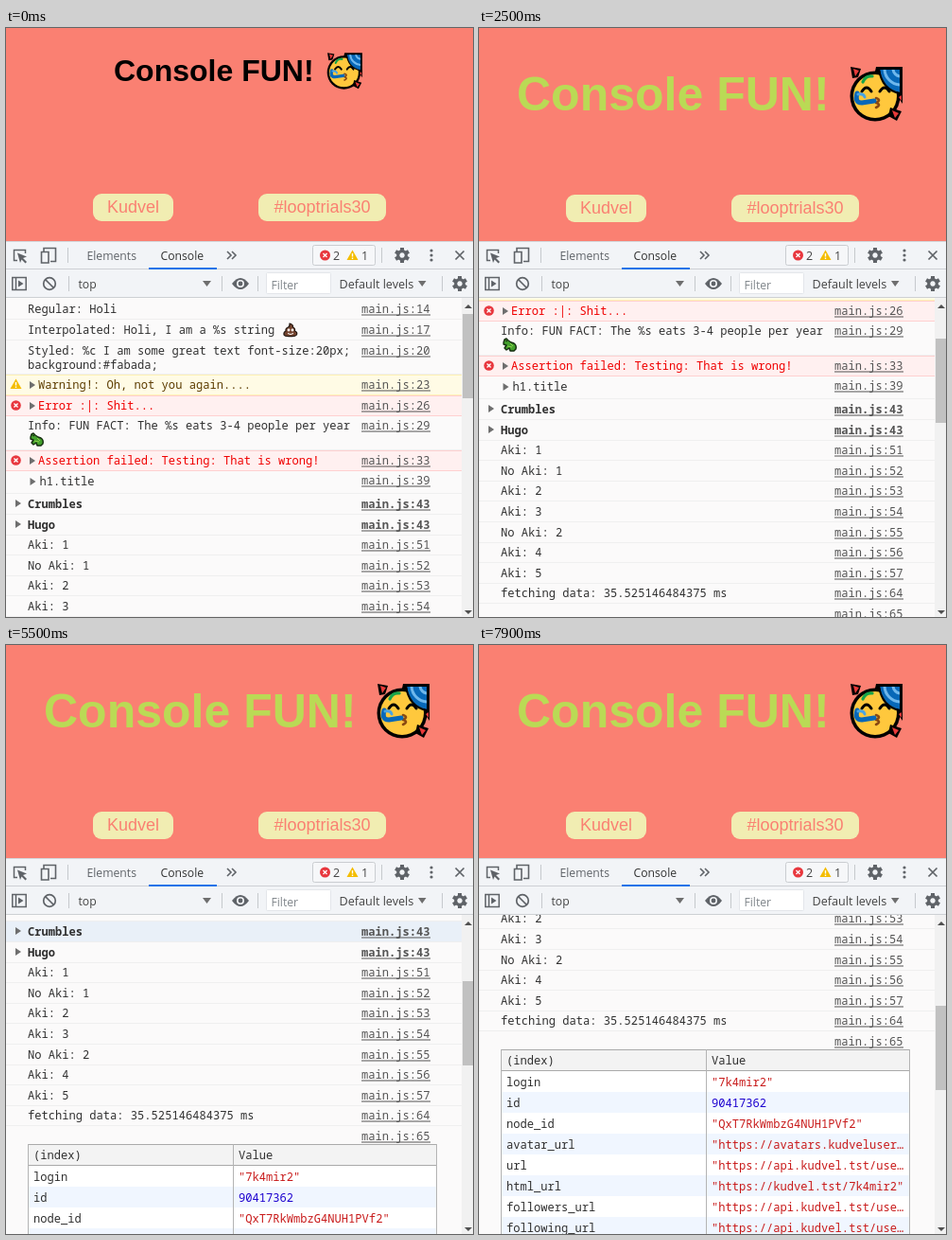
Write an HTML page with a canvas that moves like this. It is 494 px wide and 622 px high and loops after 8000 ms.

```html
<!DOCTYPE html>
<html lang="en">
<head>
<meta charset="utf-8">
<title>Console FUN!</title>
<style>
  html, body { margin: 0; width: 100%; height: 100%; overflow: hidden; background: #fa8072; }
  canvas { display: block; width: 494px; height: 622px; }
</style>
</head>
<body>
<canvas id="stage"></canvas>
<script>
const W = 494, H = 622, LOOP = 8000, TOP = 285, ROW = 21.6;
const MONO = '"Noto Sans Mono", "DejaVu Sans Mono", monospace';
const UI = '"Open Sans", "Noto Sans", sans-serif';
const ARIAL = '"Liberation Sans", Arial, sans-serif';
const GREY = '#5f6368', RED = '#e8373e', AMBER = '#f4bd00';

const canvas = document.getElementById('stage');
const c = canvas.getContext('2d');
const dpr = window.devicePixelRatio || 1;
canvas.width = W * dpr;
canvas.height = H * dpr;

// Scroll position at each step
const SCROLL = [
  [0, 0], [2300, 1], [2400, 70], [2500, 100],
  [2900, 101], [3000, 170], [3100, 200],
  [7700, 201], [7800, 270], [7900, 300]
];

const LOG = [
  { line: 14, text: 'Regular: Holi', h: 22 },
  { line: 17, text: 'Interpolated: Holi, I am a %s string', h: 22, emoji: [poop, 293, -8] },
  { line: 20, text: 'Styled: %c I am some great text font-size:20px;', more: 'background:#fabada;', h: 36 },
  { line: 23, text: 'Warning!: Oh, not you again....', kind: 'warn' },
  { line: 26, text: 'Error :|: Shit...', kind: 'error' },
  { line: 29, text: 'Info: FUN FACT: The %s eats 3-4 people per year', h: 36.6, emoji: [croc, 25, 7] },
  { line: 33, text: 'Assertion failed: Testing: That is wrong!', kind: 'error' },
  { line: 39, text: 'h1.title', kind: 'node', h: 24.6 },
  { line: 43, text: 'Crumbles', kind: 'group', age: 2 },
  { line: 43, text: 'Hugo', kind: 'group', age: 8 },
  ...['Aki: 1', 'No Aki: 1', 'Aki: 2', 'Aki: 3', 'No Aki: 2', 'Aki: 4', 'Aki: 5']
    .map((text, i) => ({ line: 51 + i, text })),
  { line: 64, text: 'fetching data: 35.525146484375 ms' },
  { line: 65, text: '', kind: 'table' }
];

const api = '"https://api.kudvel.tst/use…';
const TABLE = [
  ['login', '"7k4mir2"'], ['id', '90417362'], ['node_id', '"QxT7RkWmbzG4NUH1PVf2"'],
  ['avatar_url', '"https://avatars.kudveluser…'], ['url', api],
  ['html_url', '"https://kudvel.tst/7k4mir2"'], ['followers_url', api],
  ['following_url', api], ['gists_url', api], ['starred_url', api]
];

const STYLE = {
  warn: { bg: '#fffbe5', edge: '#fff0b5', ink: '#5c3c00' },
  error: { bg: '#fff0f0', edge: '#ffd0d0', ink: '#f00000' }
};

function rect(x, y, w, h, fill) {
  c.fillStyle = fill;
  c.fillRect(x, y, w, h);
}

function text(s, x, y, font, fill, align = 'left') {
  c.font = font;
  c.fillStyle = fill;
  c.textAlign = align;
  c.fillText(s, x, y);
}

const mono = (s, x, y, fill = '#303030', bold) =>
  text(s, x, y, (bold ? 'bold ' : '') + '12.1px ' + MONO, fill);

function box(x, y, w, h, r, fill, edge) {
  c.beginPath();
  c.roundRect(x, y, w, h, r);
  if (fill) { c.fillStyle = fill; c.fill(); }
  if (edge) { c.strokeStyle = edge; c.lineWidth = 1; c.stroke(); }
}

function disc(x, y, r, fill) {
  c.beginPath();
  c.arc(x, y, r, 0, 7);
  c.fillStyle = fill;
  c.fill();
}

function stroke(d, color, width) {
  c.strokeStyle = color;
  c.lineWidth = width;
  c.stroke(new Path2D(d));
}

function fill(d, color) {
  c.fillStyle = color;
  c.fill(new Path2D(d));
}

function at(x, y, scale, draw) {
  c.save();
  c.translate(x, y);
  c.scale(scale, scale);
  draw();
  c.restore();
}

function errorIcon(x, y, r) {
  disc(x, y, r, RED);
  at(x, y, 1, () => stroke('M-2 -2L2 2M2 -2L-2 2', '#fff', 1.4));
}

function warnIcon(x, y) {
  at(x, y, 1, () => {
    c.lineJoin = 'round';
    fill('M0 -5.5L6 5H-6Z', AMBER);
    stroke('M0 -2V1.6M0 2.6V4', '#fff', 1.4);
  });
}

function arrow(x, y, open) {
  at(x, y, 1, () => fill(open ? 'M-4 -3H5L.5 3Z' : 'M-2.5 -4L3.5 0L-2.5 4Z', '#6e6e6e'));
}

function gear(x, y) {
  at(x, y, 1, () => {
    for (let i = 0; i < 6; i++) {
      c.rotate(Math.PI / 3);
      rect(-2, -8, 4, 5, GREY);
    }
    c.beginPath();
    c.arc(0, 0, 4.3, 0, 7);
    c.strokeStyle = GREY;
    c.lineWidth = 3.2;
    c.stroke();
  });
}

function poop(x, y) {
  at(x, y, 1, () => {
    c.lineJoin = 'round';
    const d = 'M7 1Q11 2 10.5 5Q13 6 12.5 9Q15.5 10 14.5 13Q13 15 8 14.6Q2 15 1 13Q.5 10 3 9Q2.5 6 5.5 5Q7.5 4 7 1Z';
    fill(d, '#74442f');
    stroke(d, '#241812', 1.2);
    disc(6, 8, 1.4, '#fff');
    disc(10, 8, 1.4, '#fff');
    stroke('M5 11.5Q8 13.5 11 11.5', '#fff', 1);
  });
}

function croc(x, y) {
  at(x, y, 1, () => {
    c.lineJoin = 'round';
    const d = 'M1 5L2 2L4 1L6 3L9 5L12 6Q15 8 14 12L12 14H8L7 11L4 13L2 11L4 8L1 7Z';
    fill(d, '#43a02c');
    stroke(d, '#152c10', 1.4);
    stroke('M5 9L10 10M8 6L11 9', '#8fd04c', 1);
    disc(4, 3.5, .8, '#111');
  });
}

function partyFace(x, y, scale) {
  at(x, y, scale, () => {
    c.lineJoin = c.lineCap = 'round';
    disc(29, 32, 26.5, '#000');
    fill('M30 1H58V34L47 44L27 15Z', '#000');
    disc(29, 32, 23, '#ffc83d');
    c.save();
    const hat = new Path2D('M34 4H55V28Q37 25 34 4Z');
    c.fillStyle = '#0868b8';
    c.fill(hat);
    c.clip(hat);
    for (const r of [8, 17]) {
      c.beginPath();
      c.arc(56, 3, r, 0, 7);
      c.strokeStyle = '#6fb7ec';
      c.lineWidth = 3;
      c.stroke();
    }
    c.restore();
    stroke('M33 3Q36 25 55 29', '#000', 2);
    fill('M3 1L14 3L11 12L5 13Z', '#000');
    fill('M6 3L12 5L8 11Z', '#e83a3a');
    stroke('M16 17Q19 10 26 11', '#16a34a', 3.2);
    stroke('M15 27Q20 19 25 27M34 27Q39 19 44 27', '#000', 3);
    stroke('M30 34Q36 36 30 39Q36 41 30 44', '#8a4a12', 2.6);
    stroke('M10 29Q7 39 15 39L28 37', '#0868b8', 5);
    stroke('M11 30Q17 29 18 33', '#48a4e4', 3);
    fill('M45 44L57 48L52 58L43 53Z', '#000');
    fill('M47 47L54 50L50 55Z', '#e83a3a');
    fill('M52 31L58 28V40Z', '#000');
    fill('M54 33L57 31V37Z', '#e83a3a');
  });
}

function page(big) {
  rect(0, 0, W, 226, '#fa8072');
  if (big) {
    text('Console FUN!', 40, 87, 'bold 50px ' + ARIAL, '#bada55');
    partyFace(390, 40, 1);
  } else {
    text('Console FUN!', 114, 56, 'bold 32px ' + ARIAL, '#000');
    partyFace(338, 25.5, .67);
  }
  const y = big ? 176 : 175;
  const button = (s, x, w) => {
    box(x, y, w, 29, 9, '#f1edb2');
    text(s, x + w / 2, y + 20, '18px ' + ARIAL, '#fa8072', 'center');
  };
  button('Kudvel', 92, 85);
  button('#looptrials30', 267, 135);
}

function toolbars() {
  rect(0, 225, W, 60, '#f2f4f7');
  rect(0, 225, W, 1, '#d3d6da');
  rect(0, 254, W, 1, '#cdd0d4');
  rect(0, 284, W, 1, '#cdd0d4');
  c.lineCap = 'butt';
  c.lineJoin = 'miter';
  for (const [x, y] of [[65, 232], [397, 232], [66, 262], [228, 262], [266, 262], [461, 262]])
    rect(x, y, 1, 16, '#c6c9cd');

  // Upper bar
  stroke('M12 245.5H8.5V234.5H20.5V238', GREY, 1.5);
  fill('M12 237.5L22 241.5L18 243L22 247L20.5 248.5L16.5 244.5L15 248Z', GREY);
  stroke('M40 236V232.5H52.5V246.5H47M37.5 236.5H45V248H37.5Z', GREY, 1.6);
  text('Elements', 85.5, 245, '12.2px ' + UI, GREY);
  text('Console', 163.5, 245, '12.2px ' + UI, '#333');
  rect(151, 253, 72, 2, '#1a73e8');
  stroke('M234 236L238 240L234 244M239 236L243 240L239 244', GREY, 1.6);
  box(324.5, 229.5, 66, 21, 2, '#f6f7f9', '#cacdd1');
  errorIcon(337.5, 240, 5.5);
  text('2', 346, 245, '12.5px ' + UI, '#444');
  warnIcon(366.5, 240);
  text('1', 376, 245, '12.5px ' + UI, '#444');
  gear(419, 240);
  for (const y of [235, 240, 245]) disc(450, y, 1.6, GREY);
  stroke('M475.5 235.5L484.5 244.5M484.5 235.5L475.5 244.5', GREY, 1.7);

  // Lower bar
  stroke('M6.8 263.5H21.2V276.5H6.8ZM10.5 263.5V276.5', GREY, 1.5);
  fill('M13 266.5L18.5 270L13 273.5Z', GREY);
  c.beginPath();
  c.arc(46, 270, 6.3, 0, 7);
  c.strokeStyle = GREY;
  c.lineWidth = 1.7;
  c.stroke();
  stroke('M41.5 265.5L50.5 274.5', GREY, 1.7);
  text('top', 76.5, 274.5, '12.2px ' + UI, '#444');
  fill('M208 267H217L212.5 273Z', '#6e6e6e');
  fill('M239 270Q243.5 264 248 264T257 270Q252.5 276 248 276T239 270Z', GREY);
  disc(248, 270, 4, '#f2f4f7');
  disc(248, 270, 2.4, GREY);
  box(275.5, 258.5, 68, 22, 1, '#fff', '#e3e6ea');
  text('Filter', 280.5, 275.5, '12.2px ' + UI, '#80868b');
  text('Default levels', 352.5, 274.5, '12.6px ' + UI, '#444');
  fill('M436 267H444.5L440.2 273Z', '#6e6e6e');
  gear(480, 270);
}

function link(line, y, bold) {
  mono('main.js:' + line, 376, y + 4, '#545454', bold);
  rect(376, y + 5.5, 73, 1, '#545454');
}

function table(y) {
  const end = y + 22 * (TABLE.length + 1);
  rect(23, y, 433, end - y, '#fff');
  rect(23, y, 433, 23, '#f3f3f3');
  mono('(index)', 29, y + 15.5);
  mono('Value', 246, y + 15.5);
  TABLE.forEach(([key, value], i) => {
    const top = y + 23 + 22 * i;
    if (i % 2) rect(23, top, 433, 22, '#f0f6ff');
    mono(key, 29, top + 15.5);
    mono(value, 246, top + 15.5, value[0] === '"' ? '#c81a1a' : '#1c00cf');
  });
  rect(23, y, 433, 1, '#aaa');
  rect(23, y + 22, 433, 1, '#aaa');
  for (const x of [23, 240, 455]) rect(x, y, 1, end - y, '#b4b4b4');
}

function logRow(row, y, selected, open) {
  const { kind, h = ROW } = row;
  const style = STYLE[kind];
  const top = Math.round(y - 10.8), height = Math.round(h);
  const bold = kind === 'group';
  let x = 23;
  if (selected) rect(0, top, 482, height, '#e9f0f8');
  if (style) {
    rect(0, top, 482, height, style.bg);
    rect(0, top, 482, 1, style.edge);
    rect(0, top + height - 1, 482, 1, style.edge);
    if (kind === 'warn') warnIcon(10.5, y - 1);
    else errorIcon(10.5, y - .5, 5.3);
    arrow(27.5, y, false);
    x = 34;
  } else if (kind !== 'table') {
    rect(0, top + height - 1, 482, 1, '#efefef');
  }
  if (kind === 'node') { arrow(28, y + 1, false); x = 35.5; }
  if (bold) arrow(12.5, y - 1, open);
  if (row.child) x = 38.5;
  mono(row.text, x, y + (kind === 'node' ? 5 : 4), style ? style.ink : undefined, bold);
  if (row.more) mono(row.more, 23, y + 19);
  if (row.emoji) row.emoji[0](row.emoji[1], y + row.emoji[2]);
  link(row.line, y, bold);
  if (kind === 'table') table(y + 8);
}

function consolePane(scroll, selected, open) {
  rect(0, TOP, W, H - TOP, '#fbfafa');
  c.save();
  c.beginPath();
  c.rect(0, TOP, W, H - TOP);
  c.clip();
  let y = 297;
  for (const row of LOG) {
    const isOpen = row.text && row.text === open;
    const py = Math.round(y - scroll);
    logRow(row, py, row.text && row.text === selected, isOpen);
    y += row.h || ROW;
    if (!isOpen) continue;
    const lines = [`This is ${open}`, `${open} is ${row.age} years old`, `${open} is ${row.age * 7} dog years old`];
    lines.forEach((s, i) => {
      logRow({ line: 44 + i, text: s, child: true }, Math.round(y - scroll));
      y += ROW;
    });
    rect(11, py + 11, 1, 63, '#a8a8a8');
    rect(11, py + 73, 4, 1, '#a8a8a8');
  }
  c.restore();
  scrollbar(scroll, 1170 + (open ? 3 * ROW : 0));
}

function scrollbar(scroll, total) {
  const track = 309;
  rect(482, TOP, 12, H - TOP, '#f1f1f1');
  rect(483, Math.round(302 + scroll * track / total), 11, Math.round(track * (H - TOP) / total), '#c1c1c1');
  fill('M485 296H493L489 292Z', '#505050');
  fill('M485 615H493L489 619Z', '#505050');
}

function draw(t) {
  const within = (a, b) => t >= a && t < b;
  let scroll = 0;
  for (const [start, value] of SCROLL) if (t >= start) scroll = value;
  const selected = t >= 6300 ? 'Hugo' : t >= 4800 ? 'Crumbles' : '';
  const open = within(4900, 5500) ? 'Crumbles' : within(6400, 7100) ? 'Hugo' : '';
  c.setTransform(dpr, 0, 0, dpr, 0, 0);
  page(t >= 900);
  consolePane(scroll, selected, open);
  toolbars();
}

const begin = performance.now();
function frame() {
  draw((performance.now() - begin) % LOOP);
  requestAnimationFrame(frame);
}
frame();
</script>
</body>
</html>
```
